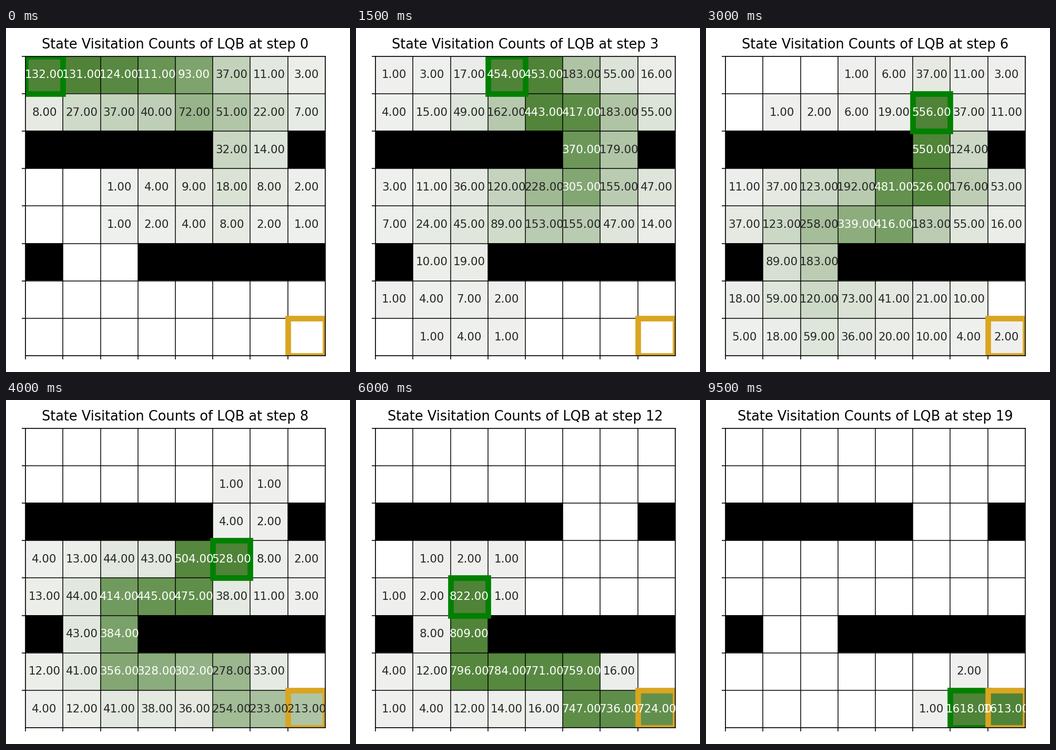
A matplotlib script that plays this animation: 654x654 px, repeating every 10 s.

```python
import numpy as np
import matplotlib.pyplot as plt
from matplotlib.animation import FuncAnimation
from matplotlib.patches import Rectangle

SIZE, DPI, N, STEPS = 654, 100, 8, 20
LEFT, RIGHT, TOP, BOTTOM = 37.2, 606.8, 53.75, 623.2
PX = 72 / DPI  # points per pixel
PALE, DEEP = np.array([240, 241, 239]) / 255, np.array([79, 131, 55]) / 255
WALLS = [(2, 0, 5), (2, 7, 8), (5, 0, 1), (5, 3, 8)]
UNVISITED = (6, 7)
ROUTE = "RRRRDRDDLDLLDDRRRDRR"
DELTA = {"R": (0, 1), "L": (0, -1), "D": (1, 0)}

# Key points of the planner's confidence over the walk
STEP_KEYS = [0, 3, 6, 8, 12, 15, 19]
PEAK = [132, 454, 556, 528, 822, 1152, 1618]   # visits at the agent
REACH = [6.1, 6.8, 6.7, 13, 63, 125, 325]      # how far ahead visits last
SHAPE = [2.5, 3, 2.4, 1.2, 1, 1, 1]            # steepness of that falloff
LEAK = [.45, .55, .5, .12, .022, .018, .009]   # share straying off the route
SPREAD = 0.3                                   # share passed on per extra cell

path = [(0, 0)]
for move in ROUTE:
    path.append(tuple(np.add(path[-1], DELTA[move])))

walls = np.zeros((N, N), bool)
for row, first, last in WALLS:
    walls[row, first:last] = True


def neighbour_max(grid):
    p = np.pad(grid, 1)
    return np.max([p[:-2, 1:-1], p[2:, 1:-1], p[1:-1, :-2], p[1:-1, 2:]],
                  axis=0)


def counts(step):
    """Visits fade along the route ahead and leak into open cells beside it."""
    peak, reach, shape, leak = (np.interp(step, STEP_KEYS, keys)
                                for keys in (PEAK, REACH, SHAPE, LEAK))
    passable = np.where(walls, 0.0, 1.0)
    passable[UNVISITED] = 0
    route, stray = np.zeros((N, N)), np.zeros((N, N))
    for visit, cell in enumerate(path):
        ahead = visit - step
        if ahead < 0:
            passable[cell] = 0.5
        else:
            route[cell] = peak * np.exp(-(ahead / reach) ** shape)
            drift = 1 - np.exp(-(ahead + 0.2) / 2)
            stray[cell] = route[cell] * drift * leak / SPREAD
    for _ in range(5):
        stray = np.maximum(stray, SPREAD * passable * neighbour_max(stray))
    return np.round(np.where(route > 0, route, stray))


plt.rcParams["font.family"] = "DejaVu Sans"
fig = plt.figure(figsize=(SIZE / DPI, SIZE / DPI), dpi=DPI, facecolor="white")
ax = fig.add_axes([LEFT / SIZE, 1 - BOTTOM / SIZE,
                   (RIGHT - LEFT) / SIZE, (BOTTOM - TOP) / SIZE])
image = ax.imshow(np.ones((N, N, 3)), extent=(0, N, N, 0), aspect="auto",
                  interpolation="nearest", zorder=0)
for k in range(1, N):
    ax.axhline(k, color="black", lw=1.5 * PX, zorder=0.8)
    ax.axvline(k, color="black", lw=1.5 * PX, zorder=0.8)
for spine in ax.spines.values():
    spine.set_linewidth(1.7 * PX)
ax.set(xlim=(0, N), ylim=(N, 0), xticks=range(N), yticks=range(N))
ax.tick_params(length=7.4 * PX, width=1.6 * PX,
               labelleft=False, labelbottom=False)


def frame_box(cell, color, zorder):
    box = Rectangle(cell[::-1], 1, 1, fill=False, ec=color, lw=10.67 * PX,
                    zorder=zorder, joinstyle="miter")
    return ax.add_patch(box)


agent = frame_box(path[0], "green", 1)
frame_box(path[-1], "goldenrod", 1.1)
title = fig.text((LEFT + RIGHT) / 2 / SIZE, 1 - 39.3 / SIZE, "",
                 ha="center", va="baseline", size=25.6 * PX)
labels = {(r, c): ax.text(c + 0.5, r + 0.5, "", ha="center", va="center",
                          size=21.4 * PX, clip_on=True, zorder=3)
          for r in range(N) for c in range(N)}


def draw(step):
    grid = counts(step)
    level = grid / grid.max()
    colors = PALE + (DEEP - PALE) * level[..., None]
    colors[grid == 0] = 1
    colors[walls] = 0
    image.set_data(colors)
    for cell, label in labels.items():
        label.set_text(f"{grid[cell]:.2f}" if grid[cell] else "")
        label.set_color("white" if level[cell] > 0.568 else "0.15")
    agent.set_xy(path[step][::-1])
    title.set_text(f"State Visitation Counts of LQB at step {step}")
    return [image, agent, title, *labels.values()]


anim = FuncAnimation(fig, draw, frames=STEPS, interval=500,
                     repeat=True, repeat_delay=0, blit=False)
plt.show()
```
